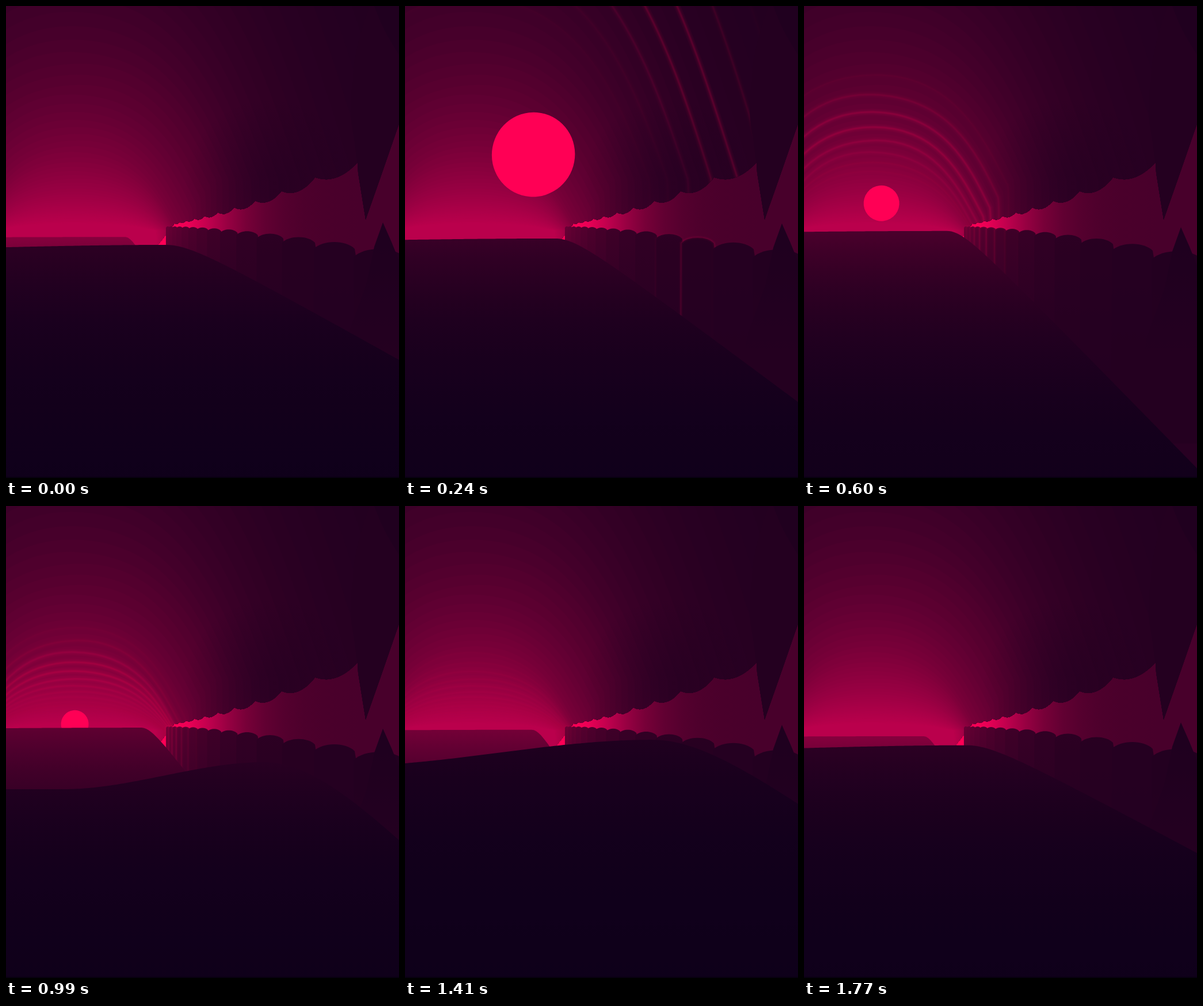
Animation of 683x820 px, one loop 1800 ms. Source, as an HTML page with a canvas:

```html
<!DOCTYPE html>
<html lang="en">
<head>
<meta charset="utf-8">
<title>Sun in a cave</title>
<style>
  html, body { margin: 0; width: 100%; height: 100%; overflow: hidden; background: #0d0019; }
  canvas { display: block; width: 683px; height: 820px; }
</style>
</head>
<body>
<canvas id="stage" width="683" height="820"></canvas>
<script>
const ctx = document.getElementById('stage').getContext('2d');
const W = 683, H = 820, LOOP = 1800, STEP = 30;
const HORIZON = 395, AXIS = 120;

const clamp = (v, lo = 0, hi = 1) => Math.min(hi, Math.max(lo, v));
const ease = (v) => { const k = clamp(v); return k * k * (3 - 2 * k); };
const bell = (v, mid, spread) => Math.exp(-(((v - mid) / spread) ** 2));

// Every tone of the scene lies on one ramp from night blue to hot pink.
const shade = (r, a = 1) => `rgba(${Math.round(r)},0,${Math.round(Math.min(85, 22 + r * 0.29))},${a})`;

// Linear gradient whose tone follows a function of 0..1.
function ramp(x0, y0, x1, y1, tone) {
  const g = ctx.createLinearGradient(x0, y0, x1, y1);
  for (let k = 0; k <= 12; k++) g.addColorStop(k / 12, shade(tone(k / 12)));
  return g;
}

function glowStroke(path, layers) {
  layers.forEach(([width, alpha]) => {
    ctx.lineWidth = width;
    ctx.strokeStyle = shade(255, alpha);
    ctx.stroke(path);
  });
}

/* Sun: it flies away, so its size falls with the inverse of time */

function sunAt(t) {
  if (t <= 100) return null;
  const r = 15 + 8000 / (t - 100);
  return { r, x: 68 + 2.15 * r, y: 349 + 0.066 * t - 1.48 * r, light: clamp((r - 20) / 4) };
}

function drawSun({ r, x, y }) {
  const stretch = 0.09 * clamp((r - 45) / 130);
  ctx.fillStyle = '#ff0055';
  ctx.beginPath();
  ctx.ellipse(x, y, r, r * (1 + stretch), 0.28, 0, Math.PI * 2);
  ctx.fill();
}

/* Cave vault */

const ceiling = (() => {
  const edge = (x) => { const u = (x - 300) / 311; return 377 - 60 * u - 45 * u * u; };
  const seam = (i) => 260 + 351 * 0.79 ** i;
  const p = new Path2D('M0 0H683V205L650 300L625 371L612 290L611 272');
  for (let i = 0; i < 10; i++) {
    const a = seam(i), b = seam(i + 1), w = a - b;
    p.quadraticCurveTo((a + b) / 2, edge((a + b) / 2) + 0.3 * w, b, edge(b) - 0.1 * w);
  }
  p.lineTo(262, 418);
  p.lineTo(262, 450);
  p.lineTo(0, 450);
  p.closePath();
  return p;
})();

// A ring whose crown stands h above the horizon.
function makeRing(h) {
  const top = HORIZON - h;
  const spread = 0.53 * (Math.hypot(h - 160, 60) + h - 160) / 2;
  const wall = 245 + 45 * (1 - Math.exp(-h / 60)) + spread;
  const w = wall - AXIS;
  const foot = clamp(477 - 0.6 * h, 300, 390);
  const knee = top + (foot - top) * 0.56;
  const bump = 0.02 * h * Math.sin(h * 1.7);
  const path = new Path2D();
  path.moveTo(AXIS - w, 450);
  path.lineTo(AXIS - w, foot);
  path.bezierCurveTo(AXIS - w * 0.82, knee + bump, AXIS - w * 0.6, top - bump, AXIS, top);
  path.bezierCurveTo(AXIS + w * 0.6, top + bump, AXIS + w * 0.82, knee - bump, wall, foot);
  path.quadraticCurveTo(wall + 4, foot + 30, wall - 3, 450);
  return { h, path, tone: 32 + 165 * Math.exp(-h / 250) };
}

// Rings shrink by a constant ratio towards the horizon.
const rings = [];
for (let i = -8; i < 23; i += 0.5) rings.push(makeRing(360 * 0.875 ** i));

function drawVault(sun) {
  ctx.save();
  ctx.clip(ceiling);
  ctx.fillStyle = shade(36);
  ctx.fillRect(0, 0, W, H);
  ctx.lineJoin = 'round';
  rings.forEach(({ h, path, tone }, i) => {
    ctx.fillStyle = shade(tone);
    ctx.fill(path);
    if (i % 2 || !sun) return;
    const mid = 11.5 * (sun.r - 14);
    const glow = sun.light * bell(h, mid, 25 + 0.18 * mid);
    if (glow > 0.02) glowStroke(path, [[11, 0.05 * glow], [6, 0.08 * glow], [2.5, 0.13 * glow]]);
  });
  const dim = ctx.createRadialGradient(460, 310, 20, 460, 310, 150);
  dim.addColorStop(0, shade(26, 0.4));
  dim.addColorStop(1, shade(26, 0));
  ctx.fillStyle = dim;
  ctx.fillRect(0, 0, W, H);
  ctx.fillStyle = shade(36);
  ctx.fill(new Path2D('M632 0Q603 80 603 130Q594 180 605 230Q612 290 625 371L650 300L683 205V0Z'));
  ctx.fillStyle = shade(32);
  ctx.fill(new Path2D('M640 0Q655 40 668 60L683 85V0Z'));
  ctx.restore();
}

/* Gap behind the vault, and the rocks along its foot */

function drawGap() {
  const span = W - 285;
  ctx.fillStyle = ramp(285, 0, W, 0, (k) => 72 + 185 * Math.exp(-((k * span / 110) ** 1.7)));
  ctx.fillRect(255, 190, W, 270);
}

function drawRocks(sun, sway) {
  ctx.fillStyle = shade(40);
  ctx.fillRect(300, 455, W, H);
  const seam = (i) => 260 + 345 * 0.8 ** i;
  for (let i = 12; i >= -1; i--) {
    const a = seam(i + 1), b = seam(i), w = b - a, x = (a + b) / 2;
    const far = Math.max(0, (x - 300) / 320);
    const y = 384 + 31 * far ** 1.5 + 0.45 * sway * far;
    const side = y + 0.2 * w;
    const tone = 34 + 70 * Math.exp(-(x - 280) / 90);
    const path = new Path2D();
    path.moveTo(a - 2, 700);
    path.lineTo(a - 1, side);
    path.bezierCurveTo(a + 0.2 * w, y - 2, b - 0.2 * w, y - 2, b + 1, side);
    path.quadraticCurveTo(b + 0.25 * w, y + 1.5 * w, b + 2, 700);
    ctx.fillStyle = ramp(0, y, 0, 640, (k) => tone + (36 - tone) * k);
    ctx.fill(path);
    const glow = sun ? sun.light * bell(x, 185 + 4.4 * sun.r, 38) : 0;
    if (glow > 0.02) glowStroke(path, [[6, 0.05 * glow], [2, 0.12 * glow]]);
  }

  const tip = 376 + sway;
  ctx.fillStyle = ramp(0, tip, 0, 620, (k) => 30 + 6 * k);
  ctx.fill(new Path2D(`M655 ${tip}l-15 42l-14 66l-30 82L560 760H683V${tip + 66}l-13 -32Z`));
}

/* Hills: each one rises in front, then recedes over later loops */

function drawHill(age) {
  if (age < 660 || age > 3750) return;
  const near = 1 / (1 + Math.exp((age - 1620) / 60));
  const left = 392 + 100 * ((age - 2850) / 1860) ** 2 + 0.8 * Math.max(0, 990 - age);
  const peakX = 270 - 0.035 * (age - 1800) + 150 * near;
  const rise = 7 + 40 * near;
  const lead = 100 - 0.5 * (age - 990);
  const slope = 0.5 + 0.85 * Math.abs(age - 1720) / 1100;
  const round = Math.max(18, 50 - 0.028 * (age - 1800)) + 80 * near;
  const tone = 30 + Math.max(0.05 * (age - 1500), 0.02 * (1500 - age));

  const crest = (x) => {
    const past = Math.max(0, x - peakX);
    return left - rise * ease((x - lead) / (peakX - lead)) + slope * (Math.hypot(past, round) - round);
  };
  ctx.fillStyle = ramp(0, left - rise, 0, Math.max(H, left + 40), (k) => 13 + (tone - 13) * Math.exp(-2.6 * k));
  ctx.beginPath();
  ctx.moveTo(0, H);
  for (let x = 0; x <= W + 4; x += 4) ctx.lineTo(x, crest(x));
  ctx.lineTo(W + 4, Math.max(H, crest(W)));
  ctx.fill();
}

function draw(t) {
  const sun = sunAt(t);
  const sway = 5.5 * (1 - Math.cos(t / LOOP * Math.PI * 2));
  ctx.fillStyle = shade(13);
  ctx.fillRect(0, 0, W, H);
  drawGap();
  drawVault(sun);
  drawRocks(sun, sway);
  if (sun) drawSun(sun);
  for (let n = 2; n >= 0; n--) drawHill(t + n * LOOP);
  ctx.fillStyle = 'rgba(4,0,10,0.6)';
  ctx.fillRect(0, H - 2, W, 2);
}

const start = performance.now();
let shown = -1;
function tick() {
  const t = Math.floor(((performance.now() - start) % LOOP) / STEP) * STEP;
  if (t !== shown) draw(shown = t);
  requestAnimationFrame(tick);
}
tick();
</script>
</body>
</html>
```
